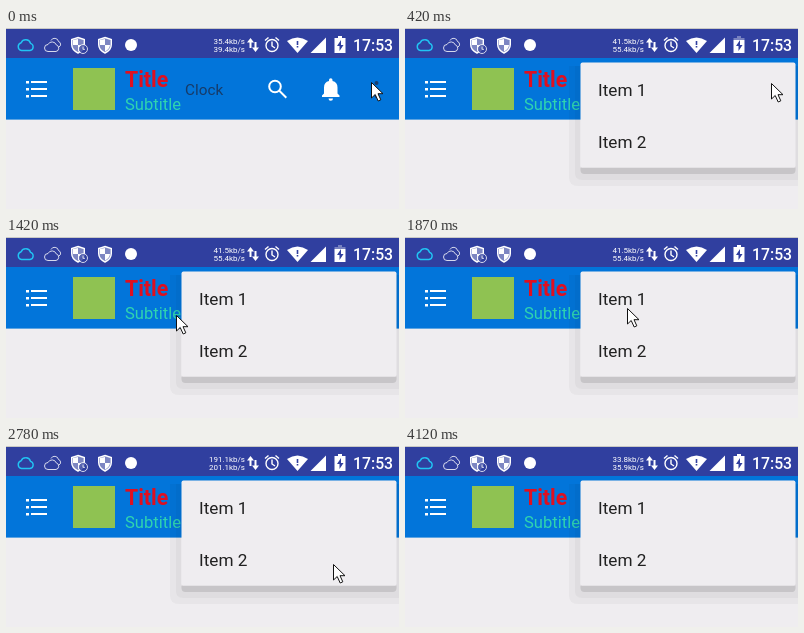
Recreate the animation shown at these times as an HTML page. Size 393 px wide and 181 px high, loop 4.22 s.

```html
<!DOCTYPE html>
<html lang="en">
<head>
<meta charset="utf-8">
<title>App bar menu</title>
<style>
html, body { margin: 0; width: 100%; height: 100%; overflow: hidden; background: #efedf0 }
svg { display: block; font-family: Roboto, sans-serif }
.line { fill: none; stroke: #fff; stroke-width: 1.4 }
.thin { stroke-width: 1; opacity: .8 }
.bold { stroke-width: 2 }
</style>
</head>
<body>
<svg width="393" height="181" viewBox="0 0 393 181">
  <rect width="393" height="181" fill="#efedf0"/>
  <rect width="393" height="31" fill="#303f9f"/>
  <rect width="393" height="1" fill="#c9c9c6"/>
  <rect y="30" width="393" height="61" fill="#0275da"/>
  <rect y="91" width="393" height="1" fill="#5fa5e2"/>

  <!-- status bar -->
  <path class="line" style="stroke:#21c4f3" d="M15.5 22.5a4 4 0 0 1-.3-7.8a5 5 0 0 1 9.3.6a3.7 3.7 0 0 1-.5 7.2z"/>
  <path class="line thin" d="M42 23.5a3.5 3.5 0 0 1 0-7a4.5 4.5 0 0 1 8.3.4a3.4 3.4 0 0 1-.3 6.6zM45 12.5a4 4 0 0 1 7.5 1a3 3 0 0 1 .5 5.5"/>
  <g id="shield">
    <path class="line" style="fill:#7d86c2" d="M99 9.5l6.3 2v5q0 5.5-6.3 8.500q-6.300-3-6.300-8.500v-5z"/>
    <path fill="#fff" d="M99 11v6h-5v-5zM99 17h5q-.5 4-5 6.500z"/>
  </g>
  <use href="#shield" x="-27"/>
  <circle class="line thin" style="fill:#303f9f" cx="77" cy="21" r="4.500"/>
  <path class="line thin" d="M77 18.500v2.800h2"/>
  <circle cx="125" cy="17" r="6" fill="#fff"/>
  <g fill="#fff" font-size="8" text-anchor="end">
    <text id="up" x="239" y="15.500"></text>
    <text id="down" x="239" y="24"></text>
  </g>
  <path class="line bold" d="M244.500 20v-7M249.500 14v7"/>
  <path fill="#fff" d="M241 14.500l3.500-4.500 3.500 4.500zM246 19.500l3.500 4.500 3.500-4.500z"/>
  <circle class="line" cx="266" cy="17.500" r="6"/>
  <path class="line" d="M266 13.500v4.500l3 2M259 12.500l3.500-3M273 12.500l-3.500-3"/>
  <path fill="#fff" d="M281 13q10.500-7 21 0l-10.500 12z"/>
  <path fill="#303f9f" d="M290.700 13h1.600v4h-1.600zm0 5h1.600v1.600h-1.600z"/>
  <path fill="#fff" d="M320 9.500v15.500h-15.500z"/>
  <path fill="#fff" d="M328.500 12h11v13h-11z"/>
  <path id="charge" fill="#fff" d="M328.500 12v-2h3.500v-2h4v2h3.500v2z"/>
  <path fill="#303f9f" d="M335 12l-4 6h2.500v5l4-6h-2.500z"/>
  <text x="347" y="23" font-size="15.800" font-weight="500" fill="#fff">17:53</text>

  <!-- app bar -->
  <g id="row" fill="#fff"><path d="M20 53h3v2.500h-3zm5 0h16v2h-16z"/></g>
  <use href="#row" y="7"/>
  <use href="#row" y="14"/>
  <rect x="67" y="40" width="42" height="42" fill="#8fc252"/>
  <text x="119" y="58.500" font-size="21.300" font-weight="700" fill="#e00f1f">Title</text>
  <text x="119" y="82.300" font-size="16.600" fill="#2fd3b0">Subtitle</text>
  <text x="179" y="67" font-size="15.300" fill="#173b68">Clock</text>
  <circle class="line bold" cx="269" cy="58.500" r="5.800"/>
  <path class="line bold" d="M273.300 62.800l7 6.900"/>
  <path fill="#fff" d="M316 69v-1.500l2-2v-6q0-5.500 5-6.500v-1a1.700 1.700 0 0 1 3.500 0v1q5 1 5 6.500v6l2 2v1.500zM322.500 70.500h4.500a2.200 2.200 0 0 1-4.500 0z"/>
  <path stroke="#1c3f6e" stroke-width="4" stroke-linecap="round" stroke-dasharray="0 6.500" d="M370.500 55v13.100"/>

  <!-- popup menu -->
  <g id="shade" fill-rule="evenodd" fill-opacity=".035">
    <path d="M164 38H393V158H173q-9 0-9-9zM175.500 38V139.500H390V38z"/>
    <path d="M170 38H393V152H177q-7 0-7-7zM175.500 38V139.500H390V38z"/>
  </g>
  <g id="menu" font-size="17.200" fill="#212121">
    <path fill="#000" fill-opacity=".11" d="M175.500 139.500H390.500V142q0 4-4 4H179.500q-4 0-4-4z"/>
    <rect x="175.500" y="34.500" width="215" height="105" rx="2" fill="#efedf0"/>
    <text x="193" y="67.500">Item 1</text>
    <text x="193" y="120">Item 2</text>
  </g>

  <path id="cursor" fill="#fff" stroke="#111" d="M.5.5V16l3.700-3.500L7.200 19l2.600-1.200L7 11.700h5z"/>
</svg>
<script>
const LOOP = 4220, STEPS = 30;
const $ = id => document.getElementById(id);
const clamp = v => Math.min(1, Math.max(0, v));

// turning points of the pointer: step, x, y
const turns = [
  [0, 365, 54], [5, 366, 55], [9, 191, 51], [10, 170, 78], [12, 237, 81],
  [14, 207, 61], [17, 211, 119], [21, 366, 117], [23, 367, 127], [26, 360, 200]
];
const speeds = ['35.4 39.4', '41.5 55.4', '191.1 201.1', '33.8 35.9'];

function pointer(step) {
  const next = turns.findIndex(p => p[0] > step);
  if (next < 0) return turns.at(-1).slice(1);
  const [a, ...from] = turns[next - 1], [b, ...to] = turns[next];
  return from.map((v, i) => Math.round(v + (to[i] - v) * (step - a) / (b - a)));
}

function draw(t) {
  // the screen refreshes in even, held steps
  const step = Math.floor((t + 36) * STEPS / LOOP);
  const menu = clamp((step - 1.3) * .6);
  const [up, down] = speeds[Math.floor((t + 1840) / 1985)].split(' ');
  const blink = Math.floor((step * LOOP / STEPS + 370) / 510) % 2;

  $('cursor').setAttribute('transform', `translate(${pointer(step)})`);
  $('up').textContent = up + 'kb/s';
  $('down').textContent = down + 'kb/s';
  $('menu').setAttribute('opacity', menu);
  $('shade').setAttribute('opacity', Math.sqrt(menu));
  $('charge').setAttribute('opacity', blink ? .35 : 1);
}

const start = performance.now();
function tick() {
  draw((performance.now() - start) % LOOP);
  requestAnimationFrame(tick);
}
tick();
</script>
</body>
</html>
```
